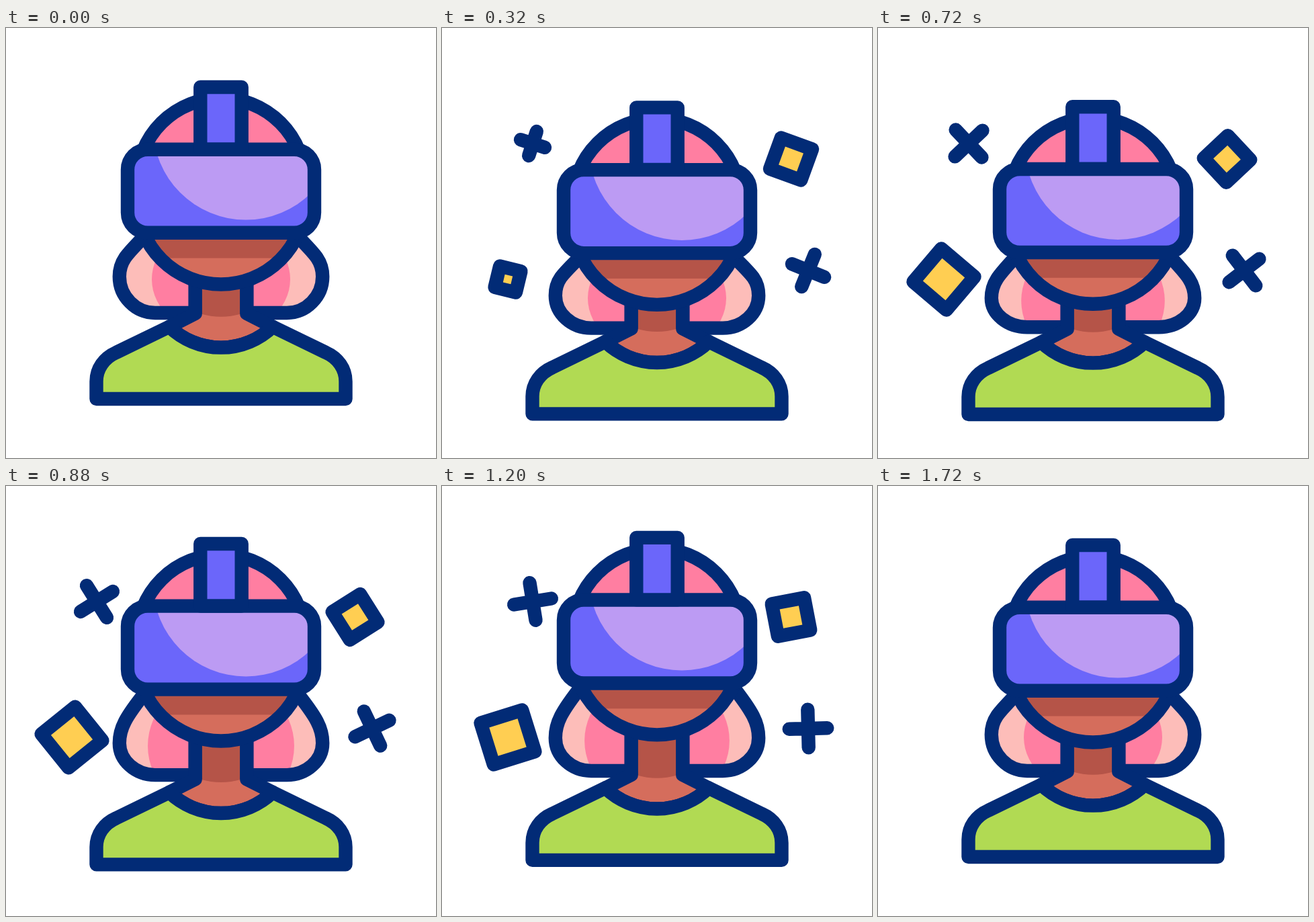
An HTML page with a canvas that plays this animation: 640 by 640 pixels, repeating every 1.76 s.

```html
<!DOCTYPE html>
<html lang="en">
<head>
<meta charset="utf-8">
<title>VR headset</title>
<style>
  html, body { margin: 0; width: 100%; height: 100%; overflow: hidden; background: #fff; }
  canvas { display: block; width: 100vmin; height: 100vmin; margin: auto; }
</style>
</head>
<body>
<canvas width="640" height="640"></canvas>
<script>
const LOOP = 1760, STEP = 40, LINE = 20.4;
const NAVY = '#022b76', PINK = '#ff7ea1', BLUSH = '#fdbdb9', SKIN = '#d56d5c', SHADE = '#b55448',
      PURPLE = '#6b66fa', LILAC = '#bc9bf3', GREEN = '#b1da53', YELLOW = '#ffce52';
const ctx = document.querySelector('canvas').getContext('2d');

// Eased value of a list of [time, value] keys.
function track(t, keys) {
  if (t <= keys[0][0]) return keys[0][1];
  for (let i = 1; i < keys.length; i++) {
    const [t0, v0] = keys[i - 1], [t1, v1] = keys[i];
    if (t < t1) {
      const x = (t - t0) / (t1 - t0);
      return v0 + (v1 - v0) * x * x * (3 - 2 * x);
    }
  }
  return keys[keys.length - 1][1];
}

const motion = {
  body:   [[0, 0], [460, 28.7], [570, 28.7], [1040, 5], [1180, 5], [1400, 0]],
  head:   [[0, 0], [530, 46.5], [570, 46.5], [985, -11.3], [1180, -11.3], [1480, 0]],
  curl:   [[0, 0], [520, 42], [570, 42], [1010, 5], [1180, 5], [1400, 0]],
  tips:   [[0, 0], [460, 29], [570, 29], [1010, 0]],
  sheenX: [[320, 103], [560, 105], [900, 109], [1180, 108], [1400, 103]]
};

// size: half extent; grow and shrink: time spans; turn: degrees at 0 ms and per ms
const sparks = [
  { kind: 'square', x: 519.5, y: 195, size: 24.6, grow: [40, 320],  shrink: [1246, 1566], turn: [-1.5, .0672] },
  { kind: 'plus',   x: 545,   y: 361, size: 28.3, grow: [40, 380],  shrink: [1236, 1556], turn: [-2, .0755] },
  { kind: 'plus',   x: 135,   y: 172, size: 28.2, grow: [80, 470],  shrink: [1328, 1648], turn: [-5, .0715] },
  { kind: 'square', x: 98,    y: 374, size: 32.3, grow: [120, 520], shrink: [1286, 1606], turn: [-8, .0672] }
];

const shapes = {
  shirt: new Path2D('M134.5 552V526C134.5 507 146 491 164 483L243 444.6A111 111 0 0 0 397 444.6L476 483C494 491 505.5 507 505.5 526V552Z'),
  neck: new Path2D('M281.7 330V425L243 444.6A111 111 0 0 0 397 444.6L358.3 425V330Z'),
  neckShade: new Path2D('M290 330V425.5Q320 434 350 425.5V330Z'),
  head: new Path2D('M195 229.4A125 125 0 0 1 445 229.4V256.5A125 125 0 0 1 195 256.5Z'),
  strap: new Path2D('M289.3 88H350.7V180.5H289.3Z'),
  visor: new Path2D(),
  glare: new Path2D()
};
shapes.visor.roundRect(181, 180.7, 278, 124, 30);
shapes.glare.arc(357, 147.4, 138.2, 0, Math.PI * 2);

function fill(path, color) {
  ctx.fillStyle = color;
  ctx.fill(path);
}

// Fills a path, adds details clipped to it, then outlines it.
function part(path, color, details) {
  fill(path, color);
  if (details) {
    ctx.save();
    ctx.clip(path);
    details();
    ctx.restore();
  }
  ctx.stroke(path);
}

function band(top, bottom, color) {
  ctx.fillStyle = color;
  ctx.fillRect(180, top, 280, bottom - top);
}

function group(draw, dx, dy, angle = 0, flip = 1) {
  ctx.save();
  ctx.translate(dx, dy);
  ctx.rotate(angle);
  ctx.scale(flip, 1);
  draw();
  ctx.restore();
}

function drawHair(head, curl, tips, sheenX) {
  const top = 306 + head, mid = 370 + curl, low = 424 + tips;
  const lock = new Path2D(`M282 ${low}H222C193 ${low} 168.8 ${mid + .55 * (low - mid)} 168.8 ${mid}
    C168.8 ${mid - 22} 177 ${mid - .48 * (mid - top)} 210 ${top}H282Z`);
  const inner = new Path2D();
  inner.ellipse(320, mid + 4, sheenX, 84 + 3 * (sheenX - 103), 0, 0, Math.PI * 2);
  const side = () => part(lock, BLUSH, () => fill(inner, PINK));
  side();
  group(side, 640, 0, 0, -1);
}

function drawBody() {
  part(shapes.neck, SKIN, () => fill(shapes.neckShade, SHADE));
  part(shapes.shirt, GREEN);
}

function drawHead() {
  part(shapes.head, SKIN, () => {
    band(80, 240, PINK);
    band(240, 342.5, SHADE);
  });
  part(shapes.visor, PURPLE, () => fill(shapes.glare, LILAC));
  part(shapes.strap, PURPLE);
}

function drawSpark(s, t) {
  const r = track(t, [[s.grow[0], 0], [s.grow[1], s.size], [s.shrink[0], s.size], [s.shrink[1], 0]]);
  if (r <= 0) return;
  const path = new Path2D();
  if (s.kind === 'square') path.rect(-r, -r, 2 * r, 2 * r);
  else path.addPath(new Path2D(`M0 ${-r}V${r}M${-r} 0H${r}`));
  const angle = (s.turn[0] + s.turn[1] * t) * Math.PI / 180;
  group(() => part(path, YELLOW), s.x, s.y, angle);
}

function draw(t) {
  const now = {};
  for (const name in motion) now[name] = track(t, motion[name]);
  ctx.fillStyle = '#fff';
  ctx.fillRect(0, 0, 640, 640);
  ctx.strokeStyle = NAVY;
  ctx.lineWidth = LINE;
  ctx.lineJoin = ctx.lineCap = 'round';
  for (const s of sparks) drawSpark(s, t);
  drawHair(now.head, now.curl, now.tips, now.sheenX);
  group(drawBody, 0, now.body);
  group(drawHead, 0, now.head);
}

const start = performance.now();
function tick() {
  const t = (performance.now() - start) % LOOP;
  draw(Math.floor(t / STEP) * STEP);
  requestAnimationFrame(tick);
}
tick();
</script>
</body>
</html>
```
